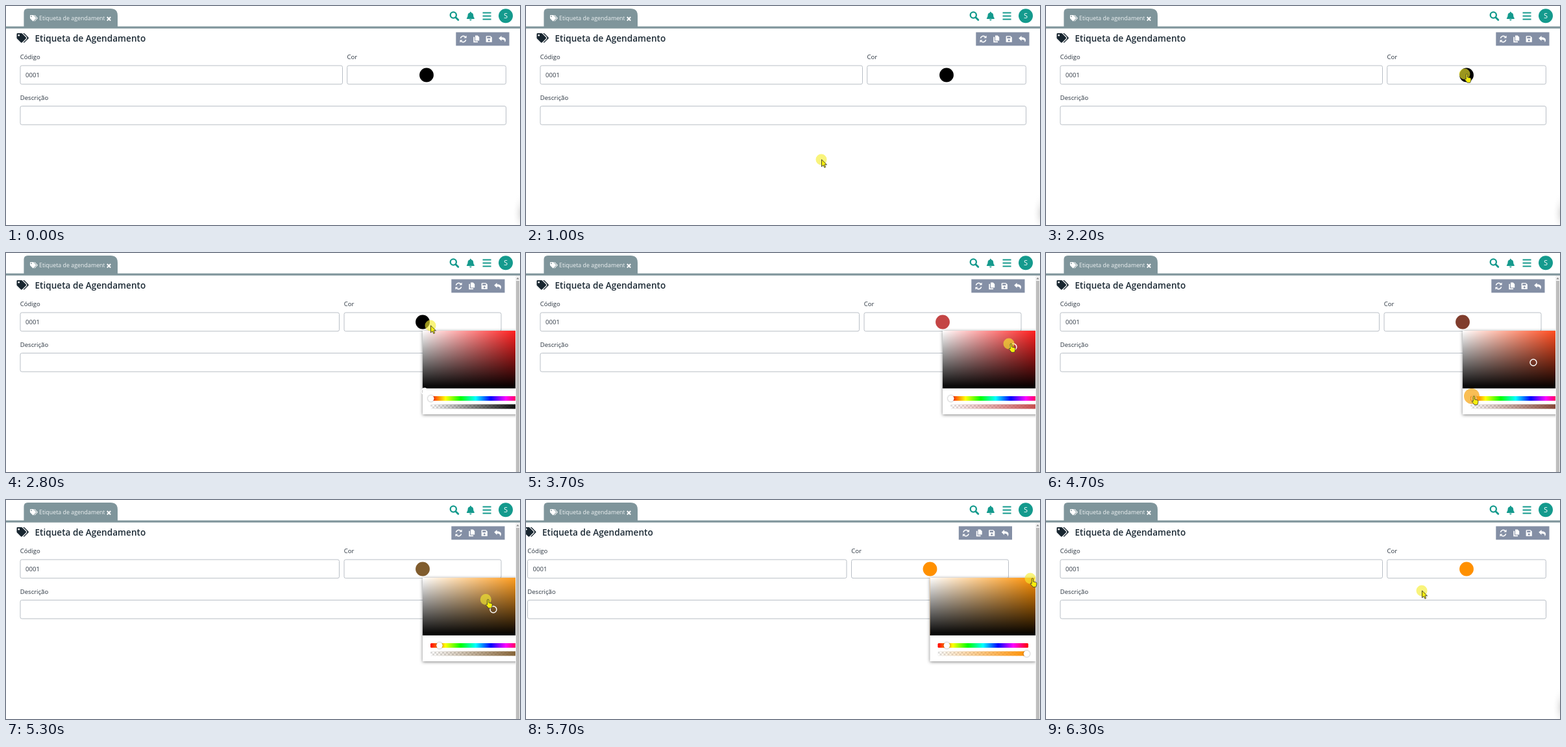
Animation, 792 px wide and 338 px high, one loop 7000 ms. Source, as an HTML page:

```html
<!DOCTYPE html>
<html lang="pt">
<head>
<meta charset="utf-8">
<title>Etiqueta de Agendamento</title>
<style>
html, body { margin: 0; width: 100%; height: 100%; overflow: hidden; background: #fff; }
svg { display: block; width: 792px; height: 338px; font-family: "Open Sans", "Noto Sans", sans-serif; }
.label { font-size: 9.6px; fill: #2b3540; }
.field { fill: #fff; stroke: #b9bfc6; stroke-width: 1; }
.line { fill: none; stroke: #fff; stroke-width: 1.6; }
.knob { fill: #fff; filter: drop-shadow(0 0 1px rgba(0,0,0,.45)); }
.panel { filter: drop-shadow(0 1px 2.5px rgba(0,0,0,.5)); }
</style>
</head>
<body>
<svg viewBox="0 0 792 338" xmlns="http://www.w3.org/2000/svg">
  <defs>
    <clipPath id="view"><rect id="viewBox" y="35" width="792" height="303"/></clipPath>
    <clipPath id="tabClip"><rect x="50" y="5" width="102" height="26"/></clipPath>
    <linearGradient id="white"><stop stop-color="#fff"/><stop offset="1" stop-color="#fff" stop-opacity="0"/></linearGradient>
    <linearGradient id="black" x2="0" y2="1"><stop stop-opacity="0"/><stop offset="1"/></linearGradient>
    <linearGradient id="hues"></linearGradient>
    <linearGradient id="alpha"><stop id="a0" stop-opacity="0"/><stop id="a1" offset="1"/></linearGradient>
    <radialGradient id="shade"><stop stop-color="#dcdcdc"/><stop offset="1" stop-color="#fff" stop-opacity="0"/></radialGradient>
    <pattern id="check" width="6" height="6" patternUnits="userSpaceOnUse">
      <rect width="6" height="6" fill="#fff"/><path d="M0 0h3v6h3V3H0Z" fill="#ddd"/>
    </pattern>
    <g id="tags">
      <path fill-rule="evenodd" d="M1.5 0H8q.8 0 1.2.5L15.6 7q1 1 0 2L9 15.6q-1 1-2 0L.4 9Q0 8.6 0 7.9V1.5Q0 0 1.5 0ZM3.5 2a1.5 1.5 0 1 0 .01 0Z"/>
      <path d="M10.4 0H12q.7 0 1.2.5L19.6 7q1 1 0 2L13 15.6q-1 1-2 0L16.5 10.1q2-2 0-4Z"/>
    </g>
  </defs>
  <rect width="792" height="338" fill="#fff"/>
  <ellipse id="corner" cx="793" cy="320" rx="13" ry="32" fill="url(#shade)"/>

  <!-- header -->
  <rect y="31.5" width="792" height="3.2" fill="#7f959b"/>
  <path d="M27.5 32V10q0-6 6-6H161q11 0 11 11v17Z" fill="#7f959b"/>
  <use href="#tags" transform="translate(37 14) scale(.59)" fill="#fff"/>
  <text x="51" y="22.3" font-size="8.9" fill="#eef2f3" clip-path="url(#tabClip)">Etiqueta de agendamento</text>
  <path d="M155.8 17l5.4 5.6m0-5.6l-5.4 5.6" stroke="#fff" stroke-width="1.9"/>
  <g fill="none" stroke="#149a8d">
    <circle cx="689.3" cy="14" r="4.6" stroke-width="2.3"/>
    <path d="M692.8 17.6l4 4" stroke-width="2.8" stroke-linecap="round"/>
    <path d="M734.5 10.5h13m-13 5h13m-13 5h13" stroke-width="2"/>
  </g>
  <path transform="translate(709.8 8.7) scale(.86)" fill="#149a8d" d="M7 16a2 2 0 0 0 2-2H5a2 2 0 0 0 2 2ZM13.7 11.3C13 10.6 12 9.4 12 6.5 12 4.2 10.3 2.3 8 1.9V1a1 1 0 0 0-2 0v.9C3.7 2.3 2 4.2 2 6.5 2 9.4 1 10.6.3 11.3-.4 12 .1 13 1 13h12c.9 0 1.4-1 .7-1.7Z"/>
  <circle cx="770" cy="15.2" r="11" fill="#149a8d"/>
  <text x="770" y="19.2" font-size="11" fill="#fff" text-anchor="middle">S</text>

  <!-- page -->
  <g clip-path="url(#view)">
    <g id="page">
      <use href="#tags" transform="translate(16.5 42) scale(.92)" fill="#182630"/>
      <text x="44.5" y="55" font-size="13.6" font-weight="600" fill="#1c2a35">Etiqueta de Agendamento</text>
      <g id="tools">
        <rect x="693.3" y="40.5" width="82.2" height="20.8" fill="#848fa5"/>
        <path class="line" d="M700.4 49.8a4.3 4.3 0 0 1 7.4-2M708.6 52.2a4.3 4.3 0 0 1-7.4 2"/>
        <path d="M709.6 45.4v4.2h-4.2ZM699.4 56.6v-4.2h4.2Z" fill="#fff"/>
        <path d="M723 45.5h3.6l2.6 2.6v5.4H723ZM720.3 47.7h1.7v6.8h5v1.8h-6.7Z" fill="#fff"/>
        <path fill-rule="evenodd" d="M740.5 46.2h6l2.3 2.3v7.2h-9.2v-8.6q0-.9.9-.9ZM741.2 47.6v2.5h5.2v-2.5ZM744.2 51.6a1.5 1.5 0 1 0 .01 0Z" fill="#fff"/>
        <path d="M759.2 49.8l4.3-3.9v2.3q6.5 0 6.5 4.6 0 2-1.7 3.5 1.1-4.6-4.8-4.6v2.2Z" fill="#fff"/>
      </g>
      <text class="label" x="21.7" y="82.2">Código</text>
      <text class="label" id="colorLabel" y="82.2">Cor</text>
      <text class="label" x="21.7" y="145.2">Descrição</text>
      <rect class="field" id="code" x="22" y="92" width="496.5" height="28.7" rx="2.5"/>
      <text class="label" x="30" y="110">0001</text>
      <rect class="field" id="color" y="92" height="28.7" rx="2.5"/>
      <rect class="field" id="desc" x="22" y="154.5" height="28.7" rx="2.5"/>
      <circle id="dot" cy="106.5" r="10.9"/>
      <g id="picker">
        <rect class="panel" x="642" y="120" width="163" height="129" fill="#fff"/>
        <rect id="base" x="642" y="120" width="163" height="89"/>
        <rect x="642" y="120" width="163" height="89" fill="url(#white)"/>
        <rect x="642" y="120" width="163" height="89" fill="url(#black)"/>
        <circle id="ring" r="5" fill="none" stroke="#fff" stroke-width="1.4"/>
        <rect x="654" y="221" width="139.5" height="7" rx="1.5" fill="url(#hues)"/>
        <rect x="654" y="233.6" width="139.5" height="7" rx="1.5" fill="url(#check)"/>
        <rect x="654" y="233.6" width="139.5" height="7" rx="1.5" fill="url(#alpha)"/>
        <circle class="knob" id="hueKnob" cy="224.6" r="4.8"/>
        <circle class="knob" cx="791" cy="237.3" r="4.8"/>
      </g>
    </g>
  </g>
  <g id="bar">
    <rect x="785" y="35" width="7" height="303" fill="#f1f1f1"/>
    <rect x="786" y="43" width="5" height="295" fill="#bdbdbd"/>
    <path d="M786.3 40.5h4.4l-2.2-2.8Z" fill="#8a8a8a"/>
  </g>
  <g id="cursor">
    <circle id="halo"/>
    <path id="arrow" d="M.5 0V11L3.1 8.6 4.9 12.4 6.7 11.6 5 7.9H8.5Z" fill="#f7ee0c" stroke="#222" stroke-width=".8"/>
    <path id="hand" d="M2.2 1.2q0-1.4 1.2-1.4t1.2 1.4V5l4 .9q1.5.4 1.4 2L9.6 11 8.6 13.3H4.2L.6 9q-.8-1.2.3-1.8l1.3.8Z" fill="#f7ee0c" stroke="#333" stroke-width=".8"/>
  </g>
</svg>
<script>
const LOOP = 7000, STEP = 100;
const $ = id => document.getElementById(id);
const set = (id, attrs) => { for (const k in attrs) $(id).setAttribute(k, attrs[k]); };
const show = (id, on) => set(id, { visibility: on ? 'visible' : 'hidden' });

// rows: time, values...
const path = [
  [500, 146, 225], [1000, 455, 237], [1600, 455, 237], [2200, 645, 105], [2600, 645, 105],
  [2800, 654, 112], [3100, 744, 140], [3900, 744, 140], [4200, 745, 164], [4300, 745, 164],
  [4600, 656, 221], [4700, 656, 221], [5000, 663, 221], [5100, 663, 221], [5400, 766, 130],
  [5700, 777, 121], [5800, 777, 121], [6100, 579, 140]
];
const hue = [[4600, 0], [4700, 12], [5000, 34]];
const sat = [[3400, 0], [3500, .65], [5400, .65], [5600, 1]];
const val = [[3400, 0], [3500, .77], [3900, .77], [4200, .5], [5400, .5], [5600, 1]];
const presses = [[2400, 2500], [3500, 3600], [4600, 5000], [5500, 5600], [6100, 6200]];
const OPEN = 2500, SCROLL = 5600, CLOSE = 6100;

function at(track, t) {
  const i = track.findIndex(k => k[0] > t);
  if (i < 0) return track[track.length - 1].slice(1);
  if (!i) return track[0].slice(1);
  const a = track[i - 1], b = track[i], p = (t - a[0]) / (b[0] - a[0]);
  const e = p * p * (3 - 2 * p);
  return a.slice(1).map((v, j) => v + (b[j + 1] - v) * e);
}

function hsv(h, s, v) {
  const f = n => {
    const k = (n + h / 60) % 6;
    return Math.round(255 * v * (1 - s * Math.max(0, Math.min(k, 4 - k, 1))));
  };
  return `rgb(${f(5)},${f(3)},${f(1)})`;
}

$('hues').innerHTML = Array.from({ length: 7 }, (_, i) =>
  `<stop offset="${i / 6}" stop-color="${hsv(i * 60, 1, 1)}"/>`).join('');

function draw(t) {
  const open = t >= OPEN && t < CLOSE;
  const shift = open && t >= SCROLL ? -19.5 : 0;
  const [h] = at(hue, t), [s] = at(sat, t), [v] = at(val, t), [x, y] = at(path, t);
  const fill = hsv(h, s, v), dotX = open ? 642 : 648;

  set('viewBox', { width: open ? 785 : 792 });
  set('page', { transform: `translate(${shift} 0)` });
  set('tools', { transform: `translate(${open ? -7 : 0} 0)` });
  set('code', { width: open ? 491.5 : 496.5 });
  set('color', { x: open ? 521 : 525.7, width: open ? 242 : 244.6 });
  set('colorLabel', { x: open ? 520.7 : 525.5 });
  set('desc', { width: open ? 741 : 748.5 });
  set('dot', { cx: dotX, fill });
  show('picker', open);
  show('bar', open);
  show('corner', !open);

  set('base', { fill: hsv(h, 1, 1) });
  set('ring', { cx: 645 + 163 * s, cy: 124.5 + 89 * (1 - v) });
  set('hueKnob', { cx: 654.8 + 139 * h / 360 });
  for (const id of ['a0', 'a1']) set(id, { 'stop-color': fill });

  const pressed = presses.some(p => t >= p[0] && t <= p[1]);
  const overDot = Math.hypot(x - dotX - shift, y - 106.5) < 11;
  const overPicker = open && x > 642 + shift && y > 119;
  const hand = overDot || overPicker, seen = t >= path[0][0];
  show('cursor', seen);
  show('hand', seen && hand);
  show('arrow', seen && !hand);
  set('cursor', { transform: `translate(${x} ${y})` });
  set('halo', {
    r: pressed ? 12 : 8.5,
    fill: pressed ? '#f7a81c' : '#f5ee30',
    'fill-opacity': pressed ? .75 : .63
  });
}

function tick() {
  const t = performance.now() % LOOP;
  draw(Math.floor(t / STEP) * STEP);
  requestAnimationFrame(tick);
}
tick();
</script>
</body>
</html>
```
